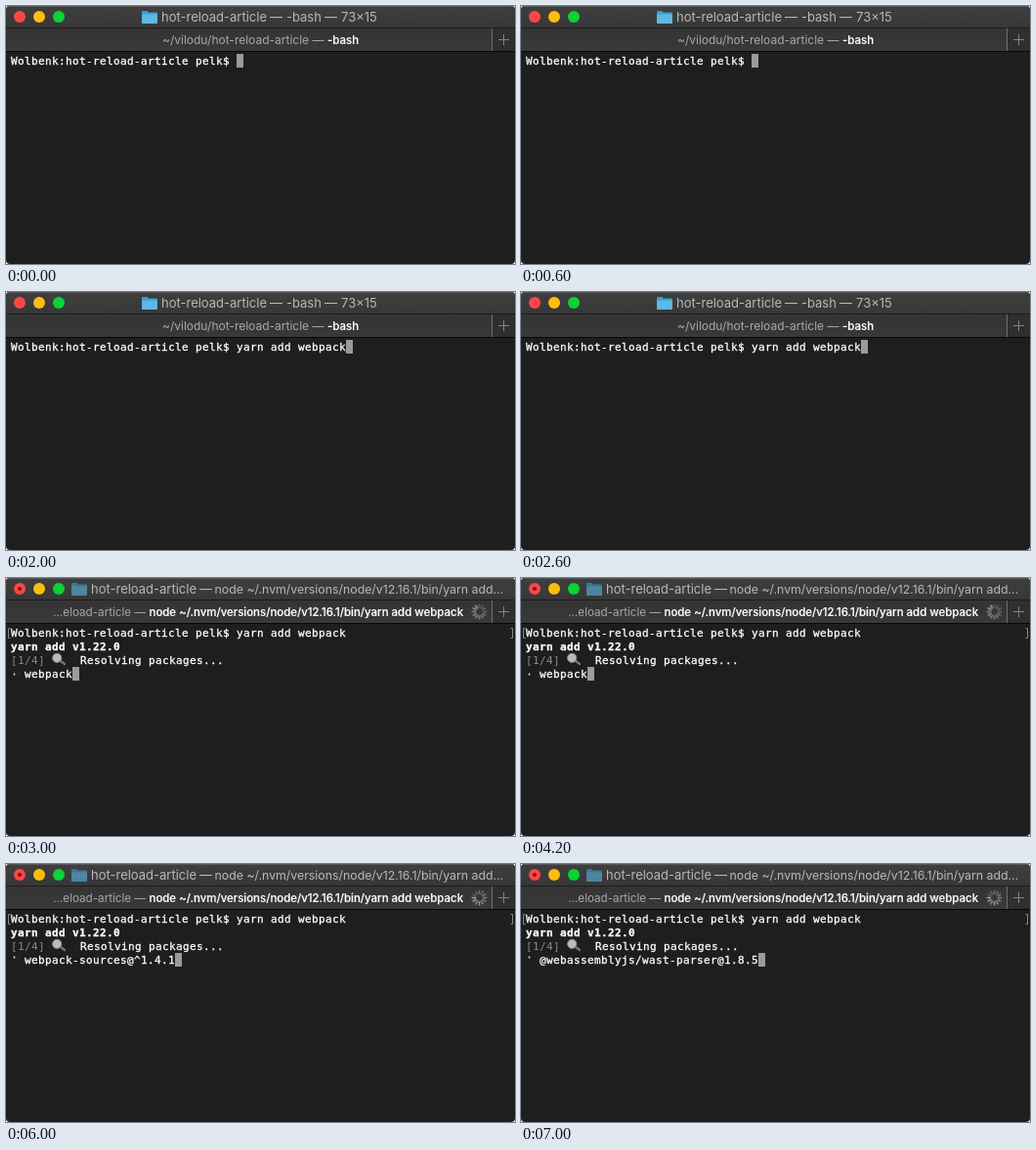
Recreate the animation shown at these times as an HTML page. Size 521 by 264 pixels, loop 8000 ms.

```html
<!DOCTYPE html>
<html lang="en">
<head>
<meta charset="utf-8">
<title>Terminal</title>
<style>
html, body { margin: 0; width: 100%; height: 100%; overflow: hidden; background: #fff; }
svg { display: block; width: 521px; height: 264px; }
text { white-space: pre; }

.ui { font-family: Inter, Roboto, sans-serif; }
.title { font-size: 13px; fill: #b8b8b8; }
.tab { font-size: 12px; fill: #a8a8a8; }
.on { font-size: 11.45px; font-weight: 500; fill: #fff; stroke: #fff; stroke-width: .2px; }
.mono {
  font: 11px "DejaVu Sans Mono", "Liberation Mono", monospace;
  letter-spacing: .378px;
  fill: #fff; stroke: #fff; stroke-width: .3px;
}
.bold { font-weight: 700; }
.dim { fill: #8a8a8a; stroke: none; }

.step, .cursor, .dot, .spin { animation: 8s step-end infinite; }
.step { opacity: 0; }
.idle { animation-name: idle; }
.run { animation-name: run; }
.typed1 { animation-name: typed1; }
.typed2 { animation-name: typed2; }
.dep1 { animation-name: dep1; }
.dep2 { animation-name: dep2; }
.dep3 { animation-name: dep3; }
.cursor { animation-name: cursor; }
.dot { animation-name: dot; }
.spin { animation-name: spin; transform-origin: 0 0; }

@keyframes idle { 0% { opacity: 1 } 37.5%, 100% { opacity: 0 } }
@keyframes run { 0% { opacity: 0 } 37.5%, 100% { opacity: 1 } }
@keyframes typed1 { 0% { opacity: 0 } 12.5% { opacity: 1 } 25%, 100% { opacity: 0 } }
@keyframes typed2 { 0% { opacity: 0 } 25%, 100% { opacity: 1 } }
@keyframes dep1 { 0% { opacity: 0 } 37.5% { opacity: 1 } 75%, 100% { opacity: 0 } }
@keyframes dep2 { 0% { opacity: 0 } 75% { opacity: 1 } 87.5%, 100% { opacity: 0 } }
@keyframes dep3 { 0% { opacity: 0 } 87.5%, 100% { opacity: 1 } }
@keyframes cursor {
  0% { transform: translate(236px, 49px) }
  12.5% { transform: translate(285px, 49px) }
  25% { transform: translate(348px, 49px) }
  37.5% { transform: translate(68px, 91px) }
  75% { transform: translate(173px, 91px) }
  87.5%, 100% { transform: translate(243px, 91px) }
}
@keyframes dot {
  0% { transform: translateY(98.5px) }
  62.5% { transform: translateY(101px) }
  75%, 100% { transform: translateY(95.5px) }
}
@keyframes spin {
  0% { transform: rotate(0deg) }
  62.5%, 100% { transform: rotate(-60deg) }
}
</style>
</head>
<body>
<svg viewBox="0 0 521 264">
  <defs>
    <linearGradient id="bar" x2="0" y2="1">
      <stop stop-color="#3f3f40"/><stop offset="1" stop-color="#373738"/>
    </linearGradient>
    <linearGradient id="tabs" x2="0" y2="1">
      <stop stop-color="#343434"/><stop offset="1" stop-color="#393939"/>
    </linearGradient>
    <clipPath id="win"><rect width="521" height="264" rx="4"/></clipPath>
    <g id="folder">
      <path d="M0 2.2Q0 1 1.2 1H5.2L6.8 2.6H14.8Q16 2.6 16 3.8V12.8Q16 14 14.8 14H1.2Q0 14 0 12.8Z" fill="#3a9fd0"/>
      <path d="M0 4.6H16V12.8Q16 14 14.8 14H1.2Q0 14 0 12.8Z" fill="#5cb8e4"/>
    </g>
  </defs>

  <g clip-path="url(#win)">
    <rect width="521" height="264" fill="#1e1e1e"/>
    <rect width="521" height="22" fill="url(#bar)"/>
    <rect width="521" height="1" fill="#555"/>
    <rect y="22" width="521" height="1" fill="#1c1c1c"/>
    <rect y="23" width="497" height="23" fill="url(#tabs)"/>
    <rect x="497" y="23" width="1" height="23" fill="#707070"/>
    <rect x="498" y="23" width="23" height="23" fill="#2f2f2f"/>
    <rect y="46" width="521" height="1" fill="#080808"/>
    <path d="M504 34.5H515M509.5 29V40" stroke="#848484"/>

    <circle cx="14" cy="11" r="6" fill="#fd4645"/>
    <circle cx="34" cy="11" r="6" fill="#fdbd10"/>
    <circle cx="54" cy="11" r="6" fill="#0ad335"/>

    <g class="ui step idle">
      <use href="#folder" x="139" y="4"/>
      <text class="title" y="16"><tspan x="159">hot-reload-article</tspan><tspan x="270">—</tspan><tspan x="287">-bash</tspan><tspan x="326">—</tspan><tspan x="343">73×15</tspan></text>
      <text class="tab" x="160" y="39">~/vilodu/hot-reload-article —</text>
      <text class="on" x="329" y="39">-bash</text>
    </g>

    <g class="ui step run">
      <circle cx="14" cy="11" r="2" fill="#7b0f0c"/>
      <use href="#folder" x="67" y="4" opacity=".6"/>
      <text class="title" y="16"><tspan x="87">hot-reload-article</tspan><tspan x="198">—</tspan><tspan x="213.5" font-size="12.33">node ~/.nvm/versions/node/v12.16.1/bin/yarn add…</tspan></text>
      <text class="tab" x="143" y="39" text-anchor="end" style="font-size:11.65px">…eload-article —</text>
      <text class="on" x="146.5" y="39">node ~/.nvm/versions/node/v12.16.1/bin/yarn add webpack</text>
      <g transform="translate(484.5 34.5)"><g class="spin" id="spinner"></g></g>
    </g>

    <rect class="cursor" width="7" height="14" fill="#9b9b9b"/>

    <g class="mono">
      <text x="5" y="60">Wolbenk:hot-reload-article pelk$</text>
      <text class="step typed1" x="236" y="60">yarn ad</text>
      <text class="step typed2" x="236" y="60">yarn add webpack</text>

      <g class="step run">
        <path d="M4.5 51.5H2.5V61.5H4.5M516.5 51.5H518.5V61.5H516.5" fill="none" stroke="#8a8a8a" stroke-width="1"/>
        <text class="bold" x="5" y="74">yarn add v1.22.0</text>
        <text class="dim" x="5" y="88">[1/4]</text>
        <path d="M56 85L60 88" stroke="#777" stroke-width="2.2" stroke-linecap="round"/>
        <circle cx="52.2" cy="81.8" r="4.6" fill="#b9bcbd" stroke="#8d8d8d" stroke-width="1"/>
        <text x="76" y="88">Resolving packages...</text>
        <circle class="dot" cx="8.5" r=".9" stroke="none"/>
      </g>

      <text class="step dep1" x="19" y="102">webpack</text>
      <text class="step dep2" x="19" y="102">webpack-sources@^1.4.1</text>
      <text class="step dep3" x="19" y="102">@webassemblyjs/wast-parser@1.8.5</text>
    </g>
  </g>
</svg>
<script>
const SPOKES = 12;
document.getElementById('spinner').innerHTML = Array.from({ length: SPOKES }, (_, i) =>
  `<path d="M0 -4V-7.3" transform="rotate(${i * 360 / SPOKES})" stroke="#d8d8d8"
    stroke-width="1.2" stroke-linecap="round" opacity="${0.35 + 0.6 * i / (SPOKES - 1)}"/>`
).join('');
</script>
</body>
</html>
```
